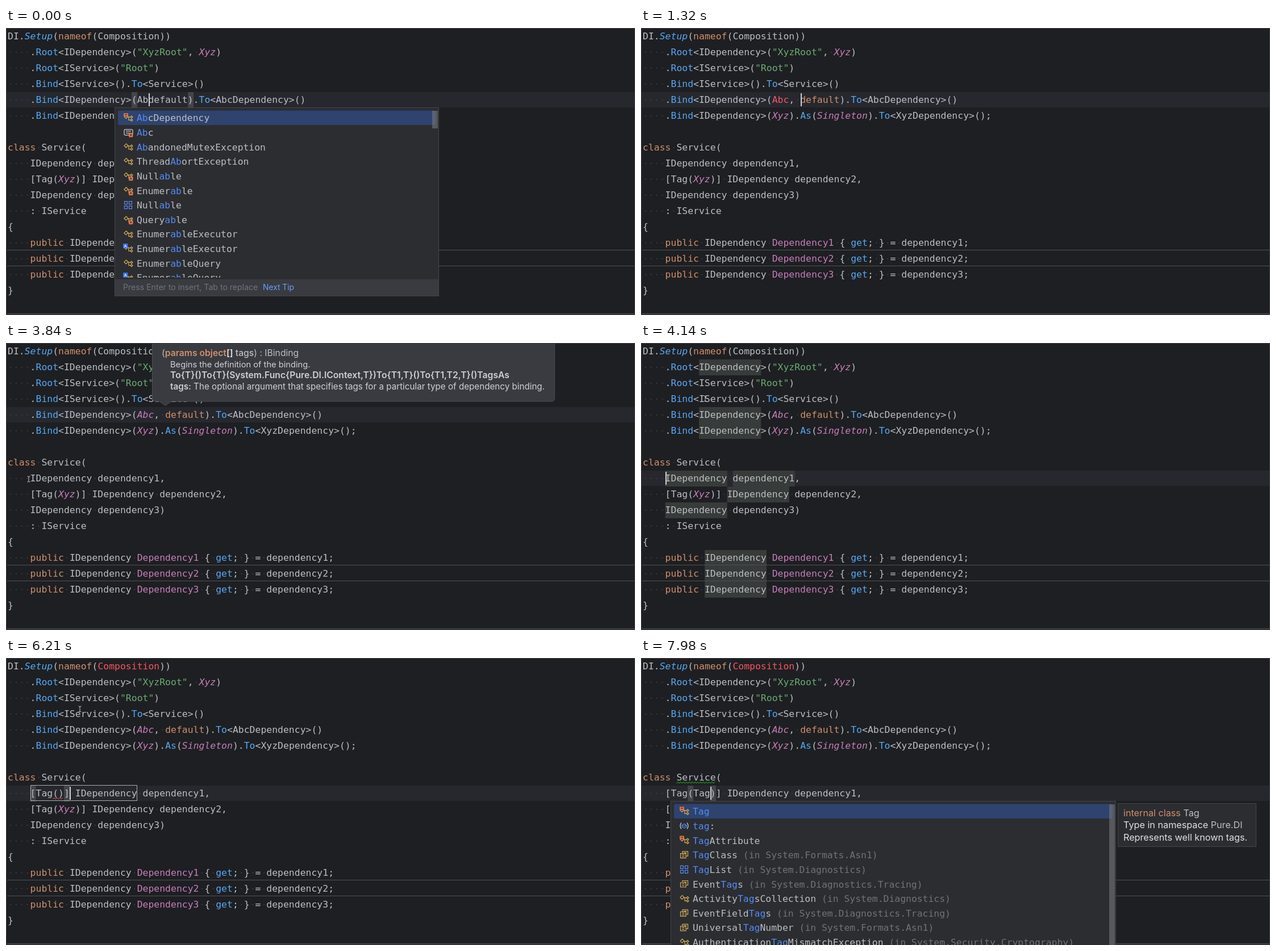
These frames come from a looping animation (1107x506 px, 8000 ms). An HTML page:

```html
<!DOCTYPE html>
<html lang="en">
<head>
<meta charset="utf-8">
<title>Code completion</title>
<style>
  html, body { margin: 0; width: 100%; height: 100%; overflow: hidden; background: #1e1f22; }
  svg { display: block; }
  #stage { width: 100vw; height: 100vh; }
  text { white-space: pre; fill: #bcbec4; }
  .code { font: 16.46px "DejaVu Sans Mono", "Noto Sans Mono", monospace; }
  .item { font: 16.4px "DejaVu Sans Mono", "Noto Sans Mono", monospace; }
  .ui { font-family: Inter, "Open Sans", sans-serif; }
</style>
</head>
<body>
<svg id="stage" viewBox="0 0 1107 506"></svg>
<script>
const LOOP = 8000, LEFT = 3, CELL = 9.912, ROW = 28;
const C = {
  text: '#bcbec4', key: '#cf8e6d', call: '#56a8f5', string: '#6aab73', member: '#c77dbb',
  error: '#f75464', hint: '#6f737a', match: '#548af7', panel: '#2b2d30', edge: '#43454a',
  usage: '#373b39', yellow: '#d6ae58', badge: '#e0714c', ok: '#1fd01f', bright: '#ced0d6'
};

const words = {};
const learn = (list, color, italic) => list.split(' ').forEach(w => words[w] = { color, italic });
learn('nameof class public default', C.key);
learn('Root Bind To As get', C.call);
learn('Setup', C.call, true);
learn('Xyz Abc Singleton', C.member, true);
learn('Dependency1 Dependency2 Dependency3', C.member);

const TYPES = ['cr AbcDependency', 'el Abc', 'c AbandonedMutexException', 'c ThreadAbortException',
  'cl Nullable', 'cl Enumerable', 'g Nullable', 'cl Queryable', 'c EnumerableExecutor',
  'ca EnumerableExecutor', 'c EnumerableQuery', 'ca EnumerableQuery'];
const TAGS = ['cr Tag', 'p tag:', 'cr TagAttribute', 's TagClass (in System.Formats.Asn1)',
  'g TagList (in System.Diagnostics)', 's EventTags (in System.Diagnostics.Tracing)',
  'c ActivityTagsCollection (in System.Diagnostics)',
  's EventFieldTags (in System.Diagnostics.Tracing)',
  's UniversalTagNumber (in System.Formats.Asn1)',
  'c AuthenticationTagMismatchException (in System.Security.Cryptography)'];

const typePopup = (o = {}) => ({ x: 191, y: 140, w: 571, h: 332, bar: 31, items: TYPES, find: 'ab', pick: 0, ...o });
const shortPopup = pick => typePopup({ h: 94, bar: 0, items: TYPES.slice(0, 2), find: 'abc', pick });
const tagPopup = find => ({ x: 52, y: 252, w: 784, h: 320, bar: 260, items: TAGS, find, pick: 0 });

const unresolved = [[8, 16, 11, C.error], [10, 16, 11, C.error]];
const emptyCall = [8, 8, 2, C.error], service = [7, 6, 7, C.ok];

// Each entry changes part of the picture from its time on.
const timeline = [
  [0, { arg: 'Abdefault', attr: '', line: 4, caret: [4, 25], popup: typePopup(), pairs: [[4, 22], [4, 32]], waves: [], red: '' }],
  [150, { arg: 'Abcdefault', caret: [4, 26], popup: typePopup({ find: 'abc' }), pairs: [[4, 22], [4, 33]] }],
  [270, { popup: shortPopup(0) }],
  [570, { popup: shortPopup(1) }],
  [690, { popup: null, pairs: [] }],
  [810, { red: 'Abcdefault', waves: unresolved }],
  [960, { arg: 'Abc,default', red: 'Abc', plain: 'default', caret: [4, 27] }],
  [1080, { arg: 'Abc, default', caret: [4, 28] }],
  [1200, { popup: typePopup({ x: 241, find: '' }) }],
  [1320, { popup: null, waves: [], plain: '' }],
  [2130, { tip: true }],
  [2410, { caret: null }],
  [2690, { caret: [4, 28], red: '', mouse: [625, 185] }],
  [2840, { mouse: [93, 86] }],
  [2990, { mouse: null }],
  [3270, { mouse: [4, 256] }],
  [3420, { mouse: [18, 244] }],
  [3570, { mouse: [30, 242] }],
  [3690, { mouse: [39, 240] }],
  [3840, { mouse: [40, 240], caret: null }],
  [3990, { tip: false, line: 8, caret: [8, 4] }],
  [4140, { usages: true, mouse: [113, 98] }],
  [4260, { mouse: [130, 91] }],
  [4540, { mouse: [130, 90] }],
  [4970, { caret: null }],
  [5120, { attr: '[Tag()] ', caret: [8, 11], pairs: [[8, 4], [8, 10]], frame: true }],
  [5280, { waves: [emptyCall] }],
  [6210, { usages: false, red: 'Composition' }],
  [6380, { caret: [8, 9], pairs: [[8, 8], [8, 9]] }],
  [6500, { waves: [emptyCall, service] }],
  [7350, { attr: '[Tag(T)] ', caret: [8, 10], pairs: [[8, 8], [8, 10]], waves: [service], frame: false, mouse: null }],
  [7470, { attr: '[Tag(Ta)] ', caret: [8, 11], pairs: [[8, 8], [8, 11]], popup: tagPopup('ta') }],
  [7590, { attr: '[Tag(Tag)] ', caret: [8, 12], pairs: [[8, 8], [8, 12]], popup: tagPopup('tag') }],
  [7980, { doc: true }]
];

const rect = (x, y, w, h, fill, more = '') =>
  `<rect x="${x}" y="${y}" width="${w}" height="${h}" fill="${fill}" ${more}/>`;
const path = (d, stroke, more = '') => `<path d="${d}" fill="none" stroke="${stroke}" ${more}/>`;
const escape = s => s.replace(/&/g, '&amp;').replace(/</g, '&lt;').replace(/>/g, '&gt;');
const span = (s, fill, more = '') => `<tspan fill="${fill}" ${more}>${escape(s)}</tspan>`;
const label = (x, y, size, content, cls = 'ui') =>
  `<text class="${cls}" x="${x}" y="${y}"${size ? ` font-size="${size}"` : ''}>${content}</text>`;
const colX = col => LEFT + col * CELL;
const rowY = row => 1 + row * ROW;
const cells = (row, col, n, fill) => rect(colX(col), rowY(row), n * CELL, ROW, fill);

function codeLines(s) {
  const property = n => `    public IDependency Dependency${n} { get; } = dependency${n};`;
  return [
    'DI.Setup(nameof(Composition))',
    '    .Root<IDependency>("XyzRoot", Xyz)',
    '    .Root<IService>("Root")',
    '    .Bind<IService>().To<Service>()',
    `    .Bind<IDependency>(${s.arg}).To<AbcDependency>()`,
    '    .Bind<IDependency>(Xyz).As(Singleton).To<XyzDependency>();',
    '',
    'class Service(',
    `    ${s.attr}IDependency dependency1,`,
    '    [Tag(Xyz)] IDependency dependency2,',
    '    IDependency dependency3)',
    '    : IService',
    '{', property(1), property(2), property(3), '}'
  ];
}

function codeLine(line, row, s) {
  const y = 20 + row * ROW;
  const tokens = (line.match(/"[^"]*"|\w+|[^\w"]+/g) || []).map(t => {
    if (t[0] === '"') return span(t, C.string);
    if (t === s.red) return span(t, C.error);
    const style = t !== s.plain && Object.hasOwn(words, t) && words[t];
    return style ? span(t, style.color, style.italic ? 'font-style="italic"' : '') : escape(t);
  });
  const dots = [...line].map((ch, i) =>
    ch === ' ' ? rect(colX(i + .5) - .7, y - 6, 1.5, 1.5, '#4b4d51') : '');
  return dots.join('') + label(LEFT, y, 0, tokens.join(''), 'code');
}

function usageMarks(lines) {
  const marks = lines.map((line, row) => {
    const names = row === 8 ? /\bI?[Dd]ependency1?\b/g : /\bIDependency\b/g;
    return [...line.matchAll(names)].map(m => cells(row, m.index, m[0].length, C.usage)).join('');
  });
  return marks.join('') + cells(18, 10, 11, C.usage);
}

function wave([row, col, n, color]) {
  const x = colX(col), y = 23.7 + row * ROW;
  let d = `M${x} ${y + 1.2}`;
  for (let i = 1; i * 2.5 <= n * CELL; i++) d += `L${x + i * 2.5} ${y + (i % 2 ? -1.2 : 1.2)}`;
  return path(d, color);
}

const shapes = {
  c: path('M-7-2l3.6-3.6 3.2 3.2-3.6 3.6zM-1.5-1.5H4M1-1.5V4H4M6-3.5l2 2-2 2-2-2zM6 2l2 2-2 2-2-2z', C.yellow, 'stroke-width="1.2"'),
  e: rect(-7, -5, 15, 10, 'none', `rx="2" stroke="${C.bright}" stroke-width="1.2"`) +
     path('M-4-2H5M-4 1.5H5', C.bright, 'stroke-width="1.2"'),
  g: path('M-6.5-6.5h5v5h-5zM1.5-6.5h5v5h-5zM-6.5 1.5h5v5h-5zM1.5 1.5h5v5h-5z', C.match, 'stroke-width="1.2"'),
  s: path('M-3-2V-6H6.5V2H3M-6.5-2.5H3V5.5H-6.5zM-4 0H.5M-4 3H.5M-.5-3.5H4', C.yellow, 'stroke-width="1.2"'),
  p: path('M-5-5.5q-4 5.5 0 11M5-5.5q4 5.5 0 11', C.bright, 'stroke-width="1.2"') +
     path('M-4-1L0-3.5 4-1V2L0 4-4 2zM-4-1L0 1 4-1', C.match, 'stroke-width="1.2"')
};
const badges = {
  r: rect(-8, -8, 8, 6, C.badge, 'rx="1"') + rect(-6, -6, 4, 1.2, C.panel),
  l: rect(1, 1, 7.5, 7.5, C.badge, 'rx="1.5"') + rect(3.7, 3.5, 2.2, 2.5, C.panel),
  a: rect(-9, -9, 8.5, 8.5, '#3574f0', 'rx="1"') + path('M-6.8-2l2-5 2 5M-6-4h2.5', '#dfe1e5')
};

function popupItem(entry, i, p) {
  const [kind, name] = entry.split(' ');
  const note = entry.slice(kind.length + 1 + name.length);
  const at = p.find ? name.toLowerCase().indexOf(p.find) : -1;
  const end = at + p.find.length;
  const y = 18.3 + i * 25.64;
  const title = at < 0 ? escape(name)
    : escape(name.slice(0, at)) + span(name.slice(at, end), C.match) + escape(name.slice(end));
  return (i === p.pick ? rect(6, y - 12.8, p.w - 12, 25.6, '#2e436e', 'rx="3"') : '') +
    `<g transform="translate(24 ${y})">${shapes[kind[0]]}${badges[kind[1]] || ''}</g>` +
    label(39, y + 6, 0, title + span(note, C.hint), 'item');
}

function popup(p) {
  const foot = p.h - 29;
  return `<g transform="translate(${p.x} ${p.y})">` +
    rect(.5, .5, p.w - 1, p.h, C.panel, `stroke="${C.edge}"`) +
    `<svg width="${p.w}" height="${foot - 3}">` +
    p.items.map((entry, i) => popupItem(entry, i, p)).join('') +
    rect(p.w - 12, 6, 10, p.bar, '#7a7d82', 'opacity=".55"') + '</svg>' +
    rect(1, foot, p.w - 2, 29, '#393b40') +
    label(15, foot + 19, 14.1, span('Press Enter to insert, Tab to replace', C.hint)) +
    label(261, foot + 19, 13.8, span('Next Tip', '#6b9bfa')) + '</g>';
}

function parameterTip() {
  const bold = 'font-weight="600"';
  return `<path d="M257.5-5V97q0 6 6 6H270l10.5 7.5L291 103H959.5q6 0 6-6V-5z" fill="#393b40" stroke="#4b4d52"/>` +
    label(274, 23, 15.7, span('(', C.text) + span('params object', C.key, bold) +
      span('[]', '#dfe1e5', bold) + span(' tags', C.text, 'font-weight="500"') + span(') : IBinding', C.text)) +
    label(289, 42.7, 14.7, span('Begins the definition of the binding.', C.bright)) +
    label(289, 62.4, 15.7, span('To{T}()To{T}(System.Func{Pure.DI.IContext,T})To{T1,T}()To{T1,T2,T}()TagsAs', C.bright, bold)) +
    label(289, 82.2, 15.2, span('tags:', C.bright, bold) +
      span(' The optional argument that specifies tags for a particular type of dependency binding.', C.bright));
}

function docPanel() {
  return rect(839.5, 256.5, 243, 76, C.panel, `stroke="${C.edge}"`) +
    label(849, 279, 16.2, span('internal class', C.key) + span(' Tag', C.text)) +
    label(849, 300.3, 16.2, span('Type in namespace ', '#dfe1e5') + span('Pure.DI', C.text)) +
    label(849, 321.5, 16.2, span('Represents well known tags.', '#dfe1e5'));
}

const pointer = ([x, y]) => path(
  `M${x - 2.5} ${y - 5}Q${x} ${y - 5} ${x} ${y - 3.5}Q${x} ${y - 5} ${x + 2.5} ${y - 5}M${x} ${y - 4}V${y + 4}` +
  `M${x - 2.5} ${y + 5}Q${x} ${y + 5} ${x} ${y + 3.5}Q${x} ${y + 5} ${x + 2.5} ${y + 5}`, '#c4c5c8');

function draw(s) {
  const lines = codeLines(s);
  return rect(0, 0, 1107, 506, '#1e1f22') +
    rect(0, rowY(s.line), 1107, ROW - 1, '#26282e') +
    (s.usages ? usageMarks(lines) : '') +
    s.pairs.map(([row, col]) => cells(row, col, 1, C.edge)).join('') +
    path('M2 391.5H1107M2 419.5H1107M2 503.5H1107', '#505257') +
    lines.map((line, row) => codeLine(line, row, s)).join('') +
    s.waves.map(wave).join('') +
    (s.frame ? rect(43.5, 224.5, 187, 27, 'none', 'stroke="#a9abb0"') : '') +
    (s.caret ? rect(Math.round(colX(s.caret[1])), rowY(s.caret[0]) + 2, 2, 23, C.bright) : '') +
    rect(.5, .5, 1106, 505, 'none', 'stroke="#424448"') +
    (s.popup ? popup(s.popup) : '') +
    (s.tip ? parameterTip() : '') +
    (s.doc ? docPanel() : '') +
    (s.mouse ? pointer(s.mouse) : '');
}

const stage = document.getElementById('stage');
let shown = 0;

function render(ms) {
  const past = timeline.filter(([at]) => at <= ms % LOOP);
  if (past.length === shown) return;
  shown = past.length;
  stage.innerHTML = draw(Object.assign({}, ...past.map(([, change]) => change)));
}

const start = performance.now();
function tick() {
  render(performance.now() - start);
  requestAnimationFrame(tick);
}
tick();
</script>
</body>
</html>
```
